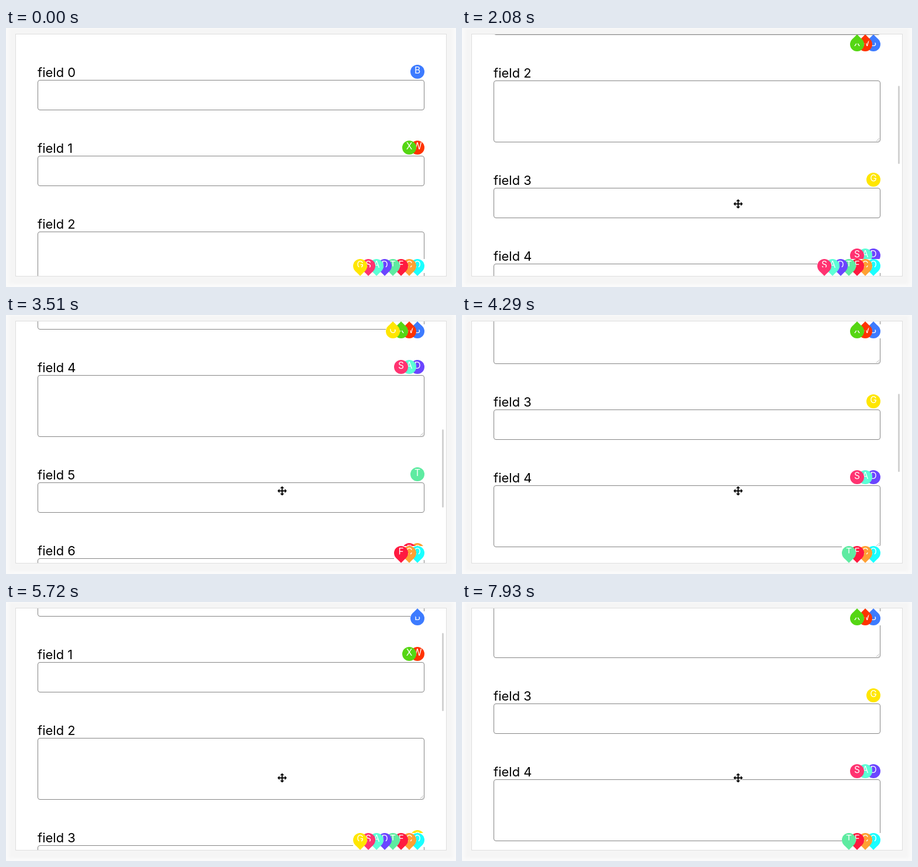
An HTML page with a canvas for the animation above (8 s loop, 770x444 px).

```html
<!DOCTYPE html>
<html lang="en">
<head>
<meta charset="utf-8">
<title>Field presence</title>
<style>
  html, body { margin: 0; width: 100%; height: 100%; overflow: hidden; background: #fafafa; }
  .card {
    position: absolute; left: 16px; top: 10px; width: 736px; height: 414px;
    background: #fff; border: 1px solid #dedede;
    box-shadow: 0 2px 4px 11px #f5f5f5;
  }
  canvas { position: absolute; left: 0; top: 0; }
</style>
</head>
<body>
<div class="card"></div>
<canvas id="stage" width="770" height="444"></canvas>
<script>
const ctx = document.getElementById('stage').getContext('2d');
const LOOP = 8000, STEP = 130;
const VIEW = { x: 17, y: 11, w: 736, h: 414 };
const LEFT = 54, RIGHT = 716, R = 12, GAP = 14;
const TOP_DOCK = 28, BOTTOM_DOCK = 408;

const COLORS = {
  B: '#3d7bff', X: '#55d613', W: '#ff3300', G: '#ffe600', S: '#ff3371', A: '#5cffd6',
  D: '#6b45ff', T: '#5eeba1', F: '#ff1a40', C: '#ffa033', O: '#1affff'
};

// Who is in each field, left to right; every even field from 2 on is a tall text area.
let nextTop = 89;
const fields = ['B', 'XW', '', 'G', 'SAD', 'T', 'FC', 'O'].map((users, i) => {
  const tall = i > 0 && i % 2 === 0;
  const field = { users, tall, label: 'field ' + i, top: nextTop, height: tall ? 106 : 52 };
  nextTop += field.height + 78;
  return field;
});

// Scroll offset as [time, position], joined by a monotone curve.
const keys = [
  [520, 0], [1430, 41], [2080, 259], [2990, 535], [3510, 560], [3770, 560],
  [4290, 371], [4810, 262], [5500, 110], [5720, 116], [6500, 359]
];
const slope = i => (keys[i + 1][1] - keys[i][1]) / (keys[i + 1][0] - keys[i][0]);
const tangents = keys.map((_, i) => {
  if (i === 0 || i === keys.length - 1) return 0;
  const a = slope(i - 1), b = slope(i);
  return a * b <= 0 ? 0 : 2 * a * b / (a + b);
});

function scrollAt(t) {
  if (t <= keys[0][0]) return 0;
  const i = keys.findIndex(k => k[0] >= t) - 1;
  if (i < 0) return keys[keys.length - 1][1];
  const [t0, p0] = keys[i], [t1, p1] = keys[i + 1];
  const d = t1 - t0, u = (t - t0) / d, v = 1 - u;
  return Math.round(
    p0 * (1 + 2 * u) * v * v + p1 * u * u * (3 - 2 * u) +
    d * u * v * (tangents[i] * v - tangents[i + 1] * u)
  );
}

// tip: -1 points up, 1 points down, 0 is a plain circle.
function badge(letter, x, y, tip) {
  ctx.fillStyle = COLORS[letter];
  ctx.beginPath();
  ctx.arc(x, y, R, 0, 2 * Math.PI);
  ctx.fill();
  ctx.fillStyle = '#fff';
  ctx.fillText(letter, x, y + 3);
  if (!tip) return;
  const half = R / Math.SQRT2;
  ctx.fillStyle = COLORS[letter];
  ctx.beginPath();
  ctx.moveTo(x, y);
  ctx.lineTo(x + half, y + tip * half);
  ctx.lineTo(x, y + tip * 2 * half);
  ctx.lineTo(x - half, y + tip * half);
  ctx.fill();
}

// A right-aligned row in which the left badge overlaps its neighbour.
function row(users, y, tip = 0) {
  if (!users) return;
  const width = 2 * R + GAP * (users.length - 1);
  ctx.font = '15.5px Inter, sans-serif';
  ctx.textAlign = 'center';
  if (tip) {
    ctx.fillStyle = '#fff';
    ctx.fillRect(RIGHT - width, y - R, width, 2 * R);
  }
  for (let i = users.length - 1; i >= 0; i--) {
    badge(users[i], RIGHT - R - GAP * (users.length - 1 - i), y, tip);
  }
}

function drawField(field, scroll) {
  const y = field.top - scroll, bottom = y + field.height;
  ctx.font = '22px Inter, sans-serif';
  ctx.textAlign = 'left';
  ctx.fillStyle = '#000';
  ctx.fillText(field.label, LEFT, y - 5);
  ctx.strokeStyle = '#858585';
  ctx.lineWidth = 1;
  ctx.beginPath();
  ctx.roundRect(LEFT + .5, y + .5, RIGHT - LEFT - 1, field.height - 1, 3.5);
  ctx.stroke();
  if (field.tall) {
    ctx.beginPath();
    for (const size of [2, 5]) {
      ctx.moveTo(RIGHT - 2 - size, bottom - 2);
      ctx.lineTo(RIGHT - 2, bottom - 2 - size);
    }
    ctx.lineWidth = .6;
    ctx.stroke();
  }
  row(field.users, y - 14);
}

function drawCursor(x, y) {
  ctx.save();
  ctx.translate(x, y);
  ctx.beginPath();
  for (let i = 0; i < 4; i++) {
    ctx.moveTo(0, 0);
    for (const [px, py] of [[-1, -1], [-1, -4.5], [-3.5, -4.5], [0, -8], [3.5, -4.5], [1, -4.5], [1, -1]]) {
      ctx.lineTo(px, py);
    }
    ctx.closePath();
    ctx.rotate(Math.PI / 2);
  }
  ctx.lineJoin = 'round';
  ctx.lineWidth = 2;
  ctx.strokeStyle = '#fff';
  ctx.stroke();
  ctx.fillStyle = '#000';
  ctx.fill();
  ctx.restore();
}

function draw(t) {
  const scroll = scrollAt(t);
  let above = '', below = '';
  ctx.clearRect(0, 0, 770, 444);
  ctx.save();
  ctx.beginPath();
  ctx.rect(VIEW.x, VIEW.y, VIEW.w, VIEW.h);
  ctx.clip();
  for (const field of fields) {
    drawField(field, scroll);
    const y = field.top - 14 - scroll;
    if (y < TOP_DOCK) above = field.users + above;
    if (y > BOTTOM_DOCK - 2 * R) below += field.users;
  }
  row(above, TOP_DOCK, -1);
  row(below, BOTTOM_DOCK, 1);

  const barAlpha = t < 650 || t >= 7020 ? 0 : t >= 6890 ? .5 : 1;
  ctx.globalAlpha = barAlpha;
  ctx.fillStyle = '#d2d2d2';
  ctx.beginPath();
  ctx.roundRect(746, Math.round(15.4 + scroll * .3225), 3, 134, 1.5);
  ctx.fill();
  ctx.restore();
  if (t >= 650) drawCursor(472.5, 301.5);
}

function tick(now) {
  const t = now % LOOP;
  draw(Math.floor(t / STEP) * STEP);
  requestAnimationFrame(tick);
}
requestAnimationFrame(tick);
</script>
</body>
</html>
```
